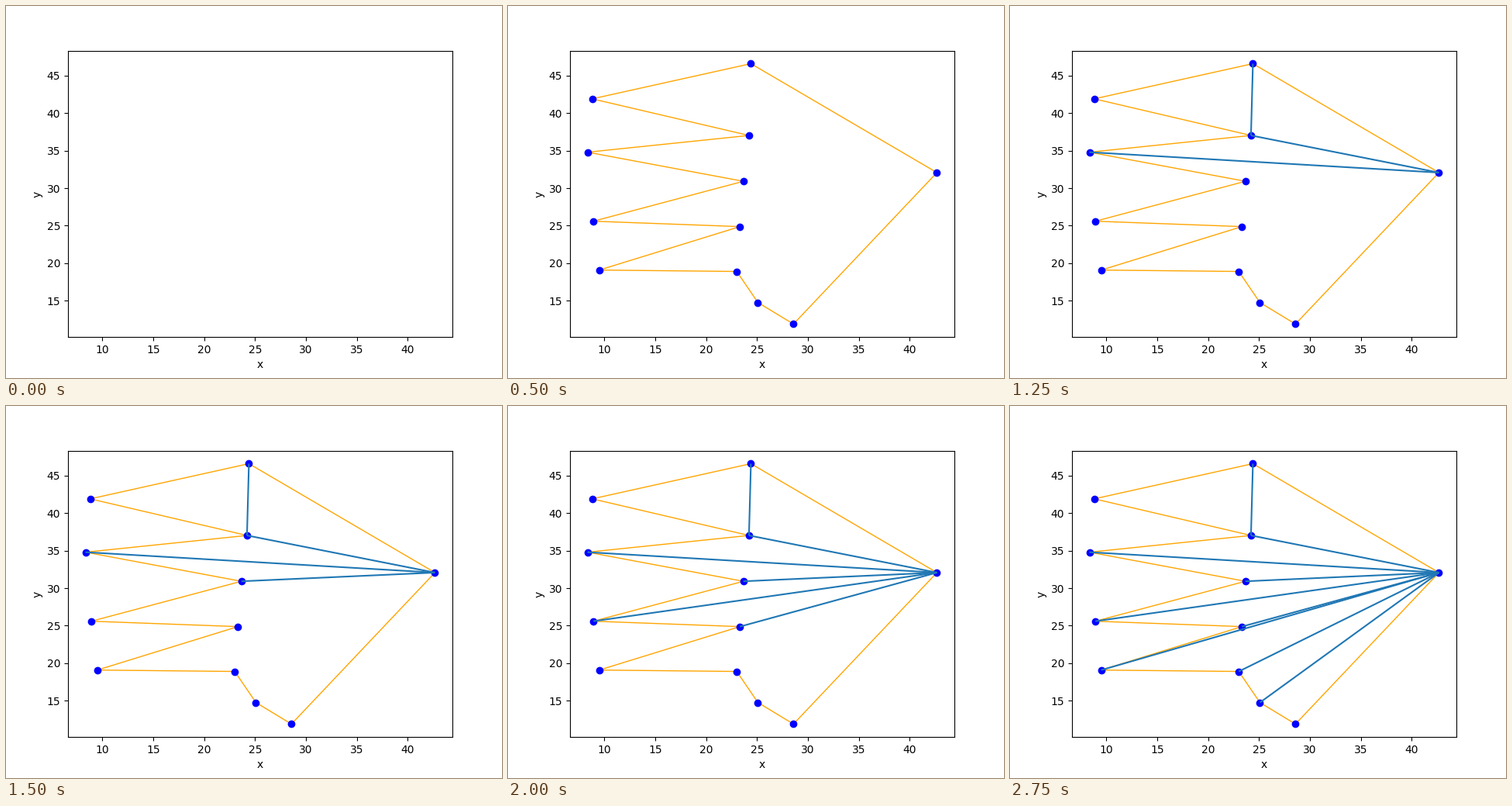
A matplotlib script for the animation above (3 s loop, 640 by 480 pixels).

```python
import matplotlib.pyplot as plt
from matplotlib.animation import FuncAnimation
from matplotlib.collections import LineCollection
from matplotlib.patches import Polygon

FRAMES = 12
INTERVAL = 250

# Key points of the zigzag polygon: from the top, down the left side, to the right tip
VERTICES = [
    (24.39, 46.60), (8.80, 41.91), (24.20, 37.03), (8.33, 34.80),
    (23.65, 30.92), (8.91, 25.60), (23.31, 24.88), (9.49, 19.09),
    (23.00, 18.90), (25.08, 14.76), (28.57, 11.89), (42.67, 32.08),
]
TOP, *CHAIN, LAST, TIP = VERTICES

# Cut off the top ear, then fan out from the right tip to the rest of the chain
DIAGONALS = [(TOP, CHAIN[1])] + [(v, TIP) for v in CHAIN[1:]]

fig, ax = plt.subplots(figsize=(6.4, 4.8), dpi=100)
ax.set(xlabel="x", ylabel="y")

outline = ax.add_patch(Polygon(VERTICES, closed=True, fill=False,
                               edgecolor="orange", linewidth=1))
dots = ax.scatter(*zip(*VERTICES), color="blue")
diagonals = ax.add_collection(LineCollection([], colors="C0", linewidths=1.5),
                              autolim=False)


def update(frame):
    """Outline first, then the dots, then one more diagonal per step."""
    outline.set_visible(frame >= 1)
    dots.set_visible(frame >= 2)
    diagonals.set_segments(DIAGONALS[:max(0, frame - 2)])
    return outline, dots, diagonals


anim = FuncAnimation(fig, update, frames=FRAMES, interval=INTERVAL,
                     init_func=lambda: update(0), repeat=True, repeat_delay=0)
plt.show()
```
